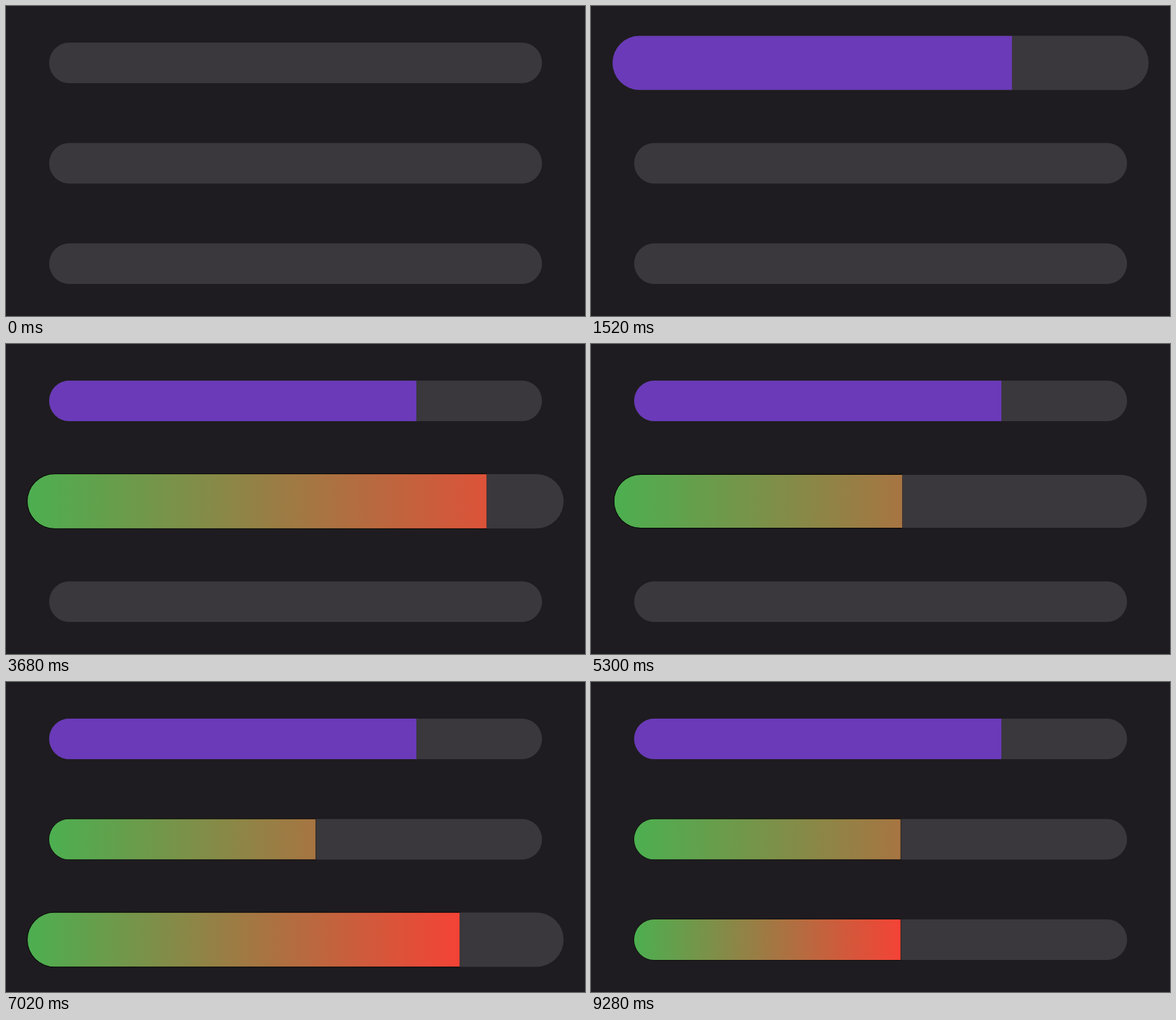
Write an HTML page that moves like this. It is 886 px wide and 474 px high and loops after 9.3 s.

```html
<!DOCTYPE html>
<html lang="en">
<head>
<meta charset="utf-8">
<title>Sliders</title>
<style>
  html, body { margin: 0; width: 100%; height: 100%; overflow: hidden; background: #1e1c20; }
  svg { display: block; width: 100%; height: 100%; }
</style>
</head>
<body>
<svg id="stage" viewBox="0 0 886 474"></svg>
<script>
const LOOP = 9300;
const REST = { left: 66, right: 820.3, half: 31 };
const HELD = { left: 33, right: 853.3, half: 41.4 };
const STIFFNESS = 16; // per second

// drag: [time in ms, value from 0 to 1]
const sliders = [
  { cy: 87, press: 240, release: 1630, paint: 'plain',
    drag: [[320, 0], [700, .33], [1100, .64], [1480, .745]] },
  { cy: 240.5, press: 2600, release: 5272, paint: 'track',
    drag: [[2690, 0], [2960, .221], [3540, .805], [3680, .856], [4160, .916], [4420, .916], [5260, .5405]] },
  { cy: 394, press: 5860, release: 8740, paint: 'value',
    drag: [[5940, 0], [6500, .44], [7020, .8055], [7220, .855], [7420, .884], [7670, .884], [8520, .5405]] }
];

const stage = document.getElementById('stage');

function set(el, attrs) {
  for (const key in attrs) el.setAttribute(key, attrs[key]);
  return el;
}

function add(parent, tag, attrs = {}) {
  return parent.appendChild(set(document.createElementNS('http://www.w3.org/2000/svg', tag), attrs));
}

const mix = (a, b, k) => a + (b - a) * k;

// Critically damped spring from 0 to 1
function spring(ms) {
  if (ms <= 0) return 0;
  const x = STIFFNESS * ms / 1000;
  return 1 - (1 + x) * Math.exp(-x);
}

function slope(keys, i) {
  if (i <= 0 || i >= keys.length - 1) return 0;
  const rate = j => (keys[j + 1][1] - keys[j][1]) / (keys[j + 1][0] - keys[j][0]);
  const a = rate(i - 1), b = rate(i);
  return a * b > 0 ? 2 * a * b / (a + b) : 0;
}

// Monotone cubic through the drag points
function valueAt(keys, t) {
  if (t <= keys[0][0]) return keys[0][1];
  const i = keys.findIndex(key => key[0] > t) - 1;
  if (i < 0) return keys[keys.length - 1][1];
  const [t0, v0] = keys[i], [t1, v1] = keys[i + 1];
  const d = t1 - t0, u = (t - t0) / d, w = 1 - u;
  return v0 * w * w * (1 + 2 * u) + v1 * u * u * (3 - 2 * u)
    + d * u * w * (slope(keys, i) * w - slope(keys, i + 1) * u);
}

function pill(el, left, right, cy, half) {
  set(el, { x: left, y: cy - half, width: right - left, height: half * 2, rx: half });
}

function build(slider, i) {
  const defs = add(stage, 'defs');
  slider.shape = add(add(defs, 'clipPath', { id: 'shape' + i }), 'rect');
  slider.track = add(stage, 'rect', { fill: '#3a383c' });
  let color = '#6a3ab8';
  if (slider.paint !== 'plain') {
    slider.ramp = add(defs, 'linearGradient', { id: 'ramp' + i, gradientUnits: 'userSpaceOnUse' });
    add(slider.ramp, 'stop', { offset: 0, 'stop-color': '#4caf50' });
    add(slider.ramp, 'stop', { offset: 1, 'stop-color': '#f44336' });
    slider.edge = add(add(defs, 'clipPath', { id: 'edge' + i }), 'rect');
    slider.rim = add(stage, 'rect', { fill: '#080808', 'clip-path': `url(#edge${i})` });
    color = `url(#ramp${i})`;
  }
  slider.bar = add(stage, 'rect', { fill: color, 'clip-path': `url(#shape${i})` });
}

function update(slider, t) {
  const grow = spring(t - slider.press) * (1 - spring(t - slider.release));
  const left = mix(REST.left, HELD.left, grow);
  const right = mix(REST.right, HELD.right, grow);
  const half = mix(REST.half, HELD.half, grow);
  const { cy } = slider;
  const width = (right - left) * valueAt(slider.drag, t);
  const box = { x: left, y: cy - half, width, height: half * 2 };

  pill(slider.track, left, right, cy, half);
  pill(slider.shape, left, right, cy, half);
  set(slider.bar, box);
  if (!slider.ramp) return;

  set(slider.ramp, { x1: left, x2: slider.paint === 'track' ? right : left + Math.max(width, 1) });
  const rim = mix(.7, 1.1, grow);
  pill(slider.rim, left - rim, right + rim, cy, half + rim);
  set(slider.edge, {
    x: left - 3, y: cy - half - 3, height: half * 2 + 6,
    width: width > 0 ? width + 3 + .6 * (1 - grow) : 0
  });
}

function draw(t) {
  sliders.forEach(slider => update(slider, t));
}

sliders.forEach(build);
draw(0);
const start = performance.now();
function tick() {
  draw((performance.now() - start) % LOOP);
  requestAnimationFrame(tick);
}
requestAnimationFrame(tick);
</script>
</body>
</html>
```
